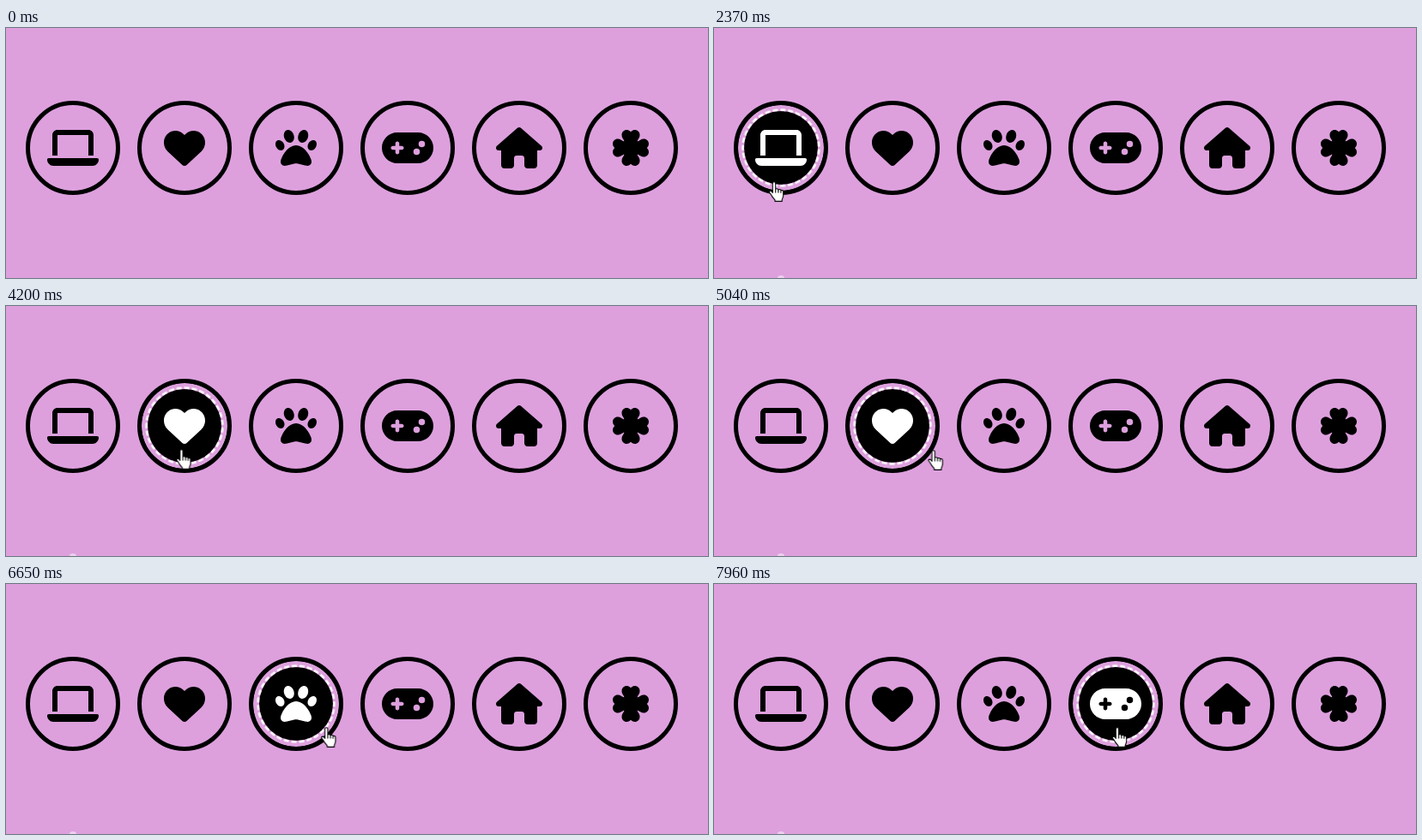
An HTML page for the animation above (8000 ms loop, 818 by 292 pixels).

```html
<!DOCTYPE html>
<html lang="en">
<head>
<meta charset="utf-8">
<title>Icon buttons</title>
<style>
  html, body { margin: 0; width: 100%; height: 100%; overflow: hidden; background: #dda0dd; }
  .stage { position: relative; width: 818px; height: 292px; overflow: hidden; }
  .button {
    position: absolute; top: 85px; left: calc(23px + 130px * var(--i));
    width: 100px; height: 100px; border: 5px solid #000; border-radius: 50%;
    color: #000; box-shadow: inset 0 0 0 0 #dda0dd;
  }
  .button svg { position: absolute; inset: 0; width: 100px; height: 100px; overflow: visible; }
  .icon { fill: currentColor; }
  .ring { opacity: 0; fill: none; stroke: #fff; stroke-width: 2.5; stroke-dasharray: 2 1; }
  .speck { position: absolute; left: 74px; top: 289px; width: 8px; height: 6px; border-radius: 50%; background: #ecd0ec; }
  .cursor { position: absolute; left: 0; top: 0; width: 20px; height: 26px; overflow: visible; }
  .cursor path { fill: #fff; stroke: #000; stroke-width: 1.1; stroke-linejoin: round; }
  .cursor .hand, .cursor.over .arrow { display: none; }
  .cursor.over .hand { display: inline; }
</style>
</head>
<body>
<div class="stage" id="stage">
  <div class="speck" id="speck"></div>
  <svg class="cursor" id="cursor">
    <path class="arrow" d="M0 0V16.5L3.8 13L6.3 18.6L8.8 17.5L6.4 12H11.6Z"/>
    <g class="hand" transform="translate(-6.5 0)">
      <path d="M6.5 .7c1 0 1.7.7 1.7 1.7v7c.3-.9 3-.9 3.2.6.5-.9 2.8-.7 3 .8.6-.7 2.8-.4 2.8 1.5v4.5c0 2.5-1.5 3.5-1.5 5v1.6H7.5v-1.5c-1.5-2-3-3.5-4-5.5-.8-1.6-2.2-2.8-2.7-4 0-1.6 2-1.6 3-.4l1 1.4V2.4c0-1 .7-1.7 1.7-1.7z"/>
      <path d="M8.2 9.4v4M11.4 10v3.6M14.4 10.8v3"/>
    </g>
  </svg>
</div>
<script>
const LOOP = 8000, START = 1250, STEP = 69.85, FADE = 500;

const path = d => `<path d="${d}"/>`;
const mirror = (shape, width) => shape + `<g transform="matrix(-1 0 0 1 ${width} 0)">${shape}</g>`;
const leaf = 'M224 256L139 171c2-2 2-5 1-8L121.4 132.2c-6.1-10.3-9.4-22-9.4-34v-4.9C112 59.4 139.4 32 173.3 32c16.2 0 31.8 6.5 43.3 17.9l1.2 1.2c3.4 3.4 9 3.4 12.4 0l1.2-1.2C242.9 38.5 258.5 32 274.7 32c33.9 0 61.3 27.4 61.3 61.3v4.9c0 12-3.3 23.7-9.4 34L308 163c-1 3-1 6 1 8z';

// Icons on a 512 unit tall grid; hover holds the times the pointer enters and leaves.
const buttons = [
  { width: 640, hover: [1650, 2980], art:
    path('M128 32C92.7 32 64 60.7 64 96V352h64V96H512V352h64V96c0-35.3-28.7-64-64-64z') +
    path('M19.2 384C8.6 384 0 392.6 0 403.2C0 445.6 34.4 480 76.8 480H563.2c42.4 0 76.8-34.4 76.8-76.8c0-10.6-8.6-19.2-19.2-19.2z') },
  { width: 512, hover: [3520, 5045], art:
    path('M47.6 300.4L228.3 469.1c7.5 7 17.4 10.9 27.7 10.9s20.2-3.9 27.7-10.9L464.4 300.4c30.4-28.3 47.6-68 47.6-109.5v-5.8c0-69.9-50.5-129.5-119.4-141C347 36.5 300.6 51.4 268 84L256 96 244 84c-32.6-32.6-79-47.5-124.6-39.9C50.5 55.6 0 115.2 0 185.1v5.8c0 41.5 17.2 81.2 47.6 109.5z') },
  { width: 512, hover: [5340, 6915], art:
    mirror(path('M226.5 92.9c14.3 42.9-.3 86.2-32.6 96.8s-70.1-15.6-84.4-58.5s.3-86.2 32.6-96.8s70.1 15.6 84.4 58.5zM100.4 198.6c18.9 32.4 14.3 70.1-10.2 84.1s-59.7-.9-78.5-33.3S-2.7 179.3 21.8 165.3s59.7.9 78.5 33.3z'), 512) +
    path('M69.2 401.2C121.6 259.9 214.7 224 256 224s134.4 35.9 186.8 177.2c3.6 9.7 5.2 20.1 5.2 30.5v1.6c0 25.8-20.9 46.7-46.7 46.7c-11.5 0-22.9-1.4-34-4.2l-88-22c-15.3-3.8-31.3-3.8-46.6 0l-88 22c-11.1 2.8-22.5 4.2-34 4.2C84.9 480 64 459.1 64 433.3v-1.6c0-10.4 1.6-20.8 5.2-30.5z') },
  { width: 640, hover: [7120, LOOP], art:
    '<path fill-rule="evenodd" d="M192 64C86 64 0 150 0 256S86 448 192 448H448c106 0 192-86 192-192S554 64 448 64zM496 168a40 40 0 1 1 0 80 40 40 0 1 1 0-80zM392 304a40 40 0 1 1 80 0 40 40 0 1 1-80 0zM168 200c0-13.3 10.7-24 24-24s24 10.7 24 24v32h32c13.3 0 24 10.7 24 24s-10.7 24-24 24H216v32c0 13.3-10.7 24-24 24s-24-10.7-24-24V280H136c-13.3 0-24-10.7-24-24s10.7-24 24-24h32z"/>' },
  { width: 576, art:
    path('M288 0c-8 0-15 2-22 8L10 231c-7 7-10 15-10 24c0 18 14 32 32 32h32V472c0 22 18 40 40 40h80c22 0 40-18 40-40V384c0-18 14-32 32-32h64c18 0 32 14 32 32v88c0 22 18 40 40 40h80c22 0 40-18 40-40V287h32c18 0 32-14 32-32c0-9-3-17-11-24L309 7c-6-5-13-7-21-7z') },
  { width: 448, art:
    [0, 90, 180, 270].map(a => `<g transform="rotate(${a} 224 256)">${path(leaf)}</g>`).join('') +
    '<rect x="141" y="173" width="166" height="166"/>' }
];

// Pointer tip: time, x, y
const route = [
  [0, 80, 290], [START, 80, 290], [1650, 76, 194], [2000, 72, 181], [2370, 70, 179],
  [2600, 80, 177], [2870, 108, 175], [2980, 124, 171], [3520, 162, 170], [3570, 173, 169],
  [3780, 190, 168], [4200, 205, 167], [4700, 230, 168], [5040, 257, 168], [5340, 291, 168],
  [5670, 345, 169], [6230, 370, 168], [6600, 372, 167], [6915, 386, 167], [7060, 408, 167],
  [7120, 416, 166], [7190, 435, 166], [7500, 458, 166], [7960, 470, 167], [LOOP, 470, 167]
];

const animations = [];
function animate(el, frames) {
  const animation = el.animate(frames, { duration: LOOP, fill: 'both' });
  animation.pause();
  animations.push(animation);
}

function fade(el, [enter, leave], off, on, fadeOut) {
  const key = (time, style) => ({ ...style, offset: Math.min(1, time / LOOP), easing: 'ease' });
  animate(el, [key(0, off), key(enter, off), key(enter + FADE, on),
    key(leave, on), key(leave + fadeOut, off), key(LOOP, off)]);
}

const stage = document.getElementById('stage');
const cursor = document.getElementById('cursor');
const speck = document.getElementById('speck');

buttons.forEach(({ width, art, hover }, i) => {
  const el = document.createElement('div');
  el.className = 'button';
  el.style.setProperty('--i', i);
  el.innerHTML = `<svg class="icon"><g transform="translate(50 50) scale(.09375) translate(${-width / 2} -256)">${art}</g></svg>` +
    '<svg class="ring"><circle cx="50" cy="50" r="44.4" pathLength="93"/></svg>';
  stage.insertBefore(el, cursor);
  if (!hover) return;
  const ring = el.querySelector('.ring');
  fade(el, hover,
    { backgroundColor: 'rgba(0,0,0,0)', color: '#000', boxShadow: 'inset 0 0 0 0 #dda0dd' },
    { backgroundColor: '#000', color: '#fff', boxShadow: 'inset 0 0 0 7px #dda0dd' }, FADE);
  fade(ring, hover, { opacity: 0 }, { opacity: 1 }, 0);
  animate(ring, [{ transform: 'rotate(0deg)' }, { transform: 'rotate(360deg)' }]);
});

animate(cursor, route.map(([time, x, y]) => ({ offset: time / LOOP, transform: `translate(${x}px, ${y}px)` })));

function draw() {
  const now = performance.now() % LOOP;
  const time = now < START ? 0 : START + Math.floor((now - START) / STEP) * STEP;
  animations.forEach(a => { a.currentTime = time; });
  cursor.classList.toggle('over', buttons.some(({ hover }) => hover && time >= hover[0] && time < hover[1]));
  cursor.style.visibility = speck.style.visibility = time < START ? 'hidden' : 'visible';
  requestAnimationFrame(draw);
}
draw();
</script>
</body>
</html>
```
